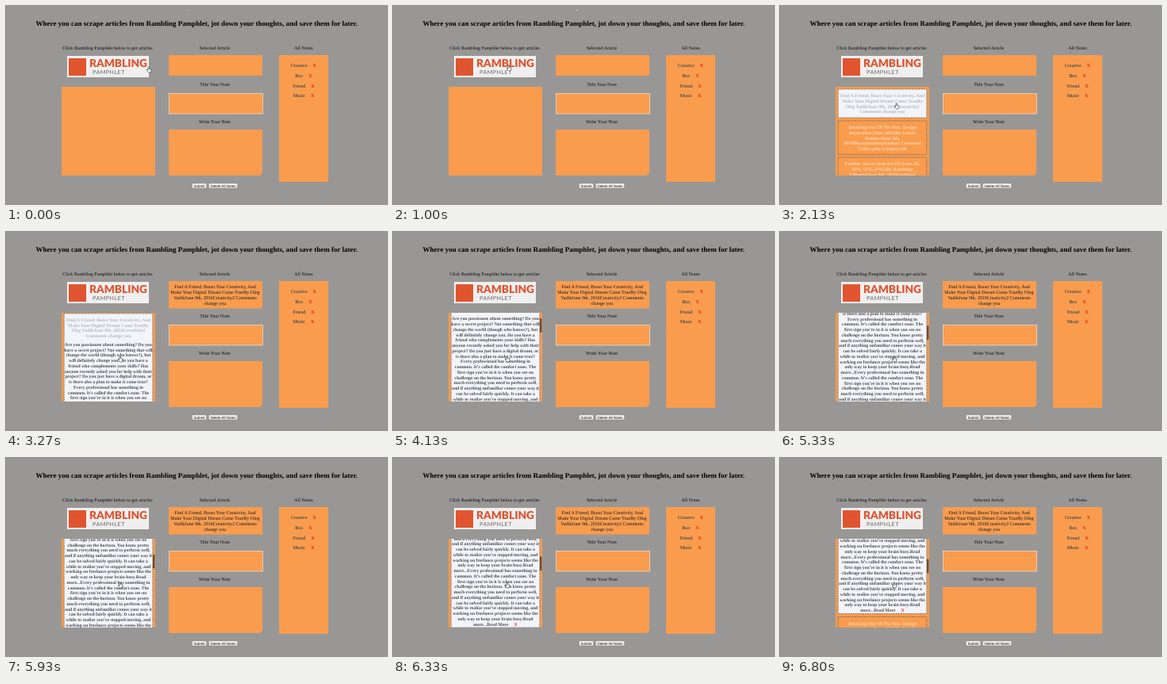
These frames come from a looping animation (480 px wide and 250 px high, 7.07 s). An HTML page:

```html
<!DOCTYPE html>
<html lang="en">
<head>
<meta charset="utf-8">
<title>Article notes</title>
<style>
  html, body { margin: 0; width: 100%; height: 100%; overflow: hidden; background: #999795; }
  svg { display: block; }
  text { font: 6.07px "Liberation Serif", serif; fill: #0c0c0c; text-anchor: middle; text-rendering: geometricPrecision; white-space: pre; }
  .title { font-size: 9.03px; font-weight: bold; fill: #000; }
  .box { fill: #f99c4e; }
  .field { stroke: #ecd9c6; stroke-width: .8; }
  .card { fill: #f99c4e; stroke: #58606a; stroke-width: .7; stroke-dasharray: 2 1; }
  .head { font-size: 5.92px; font-weight: bold; fill: #fbd7b3; }
  .body { font-size: 5.73px; font-weight: bold; fill: #4c4c50; }
  .hover .card { fill: #f2f4f9; }
  .hover .head { fill: #b6b8c0; }
  .picked { fill: #0c1a2c; }
  .note { fill: #0a3350; }
  .x { fill: #e32410; font-weight: bold; }
  .button { fill: #f4f4f4; stroke: #777; stroke-width: .4; }
  .label { font: 4.5px "Liberation Sans", sans-serif; }
  .brand { font: 900 13.7px Lato, sans-serif; fill: #e0552f; text-anchor: start; }
  .sub { font: 7.1px Lato, sans-serif; fill: #66676a; text-anchor: start; letter-spacing: .5px; }
</style>
</head>
<body>
<svg id="stage" width="480" height="250" viewBox="0 0 480 250"></svg>
<script>
const LOOP = 7070, LINE = 6.75, GROWTH = 196.5;
const LOADED = 1530, PICKED = 2470;

const intro = [
  'Are you passionate about something? Do you',
  'have a secret project? Not something that will',
  'change the world (though who knows?), but',
  'will definitely change you. Do you have a',
  'friend who complements your skills? Has',
  'anyone recently asked you for help with their',
  'project? Do you just have a digital dream, or',
  'is there also a plan to make it come true?'
];
const story = [
  'Every professional has something in',
  'common. It’s called the comfort zone. The',
  'first sign you’re in it is when you see no',
  'challenge on the horizon. You know pretty',
  'much everything you need to perform well,',
  'and if anything unfamiliar comes your way it',
  'can be solved fairly quickly. It can take a',
  'while to realize you’ve stopped moving, and',
  'working on freelance projects seems like the',
  'only way to keep your brain busy.Read'
];
const ending = 'more...Read More<tspan class="x" dx="7">X</tspan>';
const article = [...intro, ...story, 'more...' + story[0], ...story.slice(1), ending];

// Text positions name the middle of the lowercase letters.
const text = (x, y, s, cls = '') => `<text x="${x}" y="${y + 2}" class="${cls}">${s}</text>`;
const lines = (x, y, list, cls, step = LINE) =>
  list.map((s, i) => text(x, y + i * step, s, cls)).join('');
const rect = (x, y, w, h, cls, more = '') =>
  `<rect x="${x}" y="${y}" width="${w}" height="${h}" class="${cls}" ${more}/>`;
const card = (y, h, list, more = '') =>
  rect(73.2, y, 111.6, h, 'card', more) + lines(129, y + 8, list, 'head');
const button = (x, w, s) =>
  rect(x, 224, w, 6, 'button', 'rx="1.2"') + text(x + w / 2, 226.7, s, 'label');
const notes = ['Creative', 'Box', 'Friend', 'Music'].map((s, i) =>
  text(375, 75.3 + i * 12.7, `${s}<tspan class="x" dx="7">X</tspan>`, 'note')).join('');

stage.innerHTML = `
  ${rect(231, 5, 1, 1, '', 'id="dot" fill="#eee"')}
  ${text(240.3, 23.2, 'Where you can scrape articles from Rambling Pamphlet, jot down your thoughts, and save them for later.', 'title')}
  ${text(128, 52.5, 'Click Rambling Pamphlet below to get articles')}
  ${text(263, 52.5, 'Selected Article')}
  ${text(375, 52.5, 'All Notes')}
  ${rect(77, 63, 103, 27, '', 'fill="#f0efef"')}
  ${rect(79, 66, 22, 22, '', 'fill="#e0552f"')}
  <text x="105" y="77" class="brand">RAMBLING</text>
  <text x="109" y="86" class="sub">PAMPHLET</text>
  ${rect(70, 102, 118, 112, 'box')}
  <svg x="70" y="102" width="118" height="112" viewBox="70 102 118 112">
    <g id="list">
      <g id="first">
        ${card(105, 36, ['Find A Friend, Boost Your Creativity, And', 'Make Your Digital Dream Come TrueBy',
          'Oleg VadikJune 9th, 2016Creativity2', 'Comments change you'], 'id="paper"')}
        <g id="full">${lines(129, 144, article, 'body')}</g>
      </g>
      <g id="rest">
        ${card(145, 42.5, ['Breaking Out Of The Box: Design', 'Inspiration (June 2016)By Leonie', 'DekkersJune 8th,',
          '2016Illustrationinspiration1 Comment', 'Colors play a major role'])}
        ${card(191, 36, ['Freebie: Soccer Icon Set (15 Icons AI,', 'EPS, SVG, PNG)By Rambling',
          'EditorialJune 6th, 2016Freebies3', 'Comments icons'])}
      </g>
    </g>
    ${rect(185, 103, 2.4, 18, '', 'id="thumb" rx="1.2" fill="#70492a"')}
  </svg>
  ${rect(205, 62, 118, 26, 'box', 'id="chosen"')}
  <g id="picked">${lines(263.5, 68.8, ['Find A Friend, Boost Your Creativity, And',
    'Make Your Digital Dream Come TrueBy Oleg', 'VadikJune 9th, 2016Creativity2 Comments', 'change you'], 'picked', 7)}</g>
  <g id="form">
    ${text(263, 99.3, 'Title Your Note')}
    ${rect(205.5, 110.5, 118, 25.5, 'box field')}
    ${text(263, 146.2, 'Write Your Note')}
    <path d="M205 156h118v55l-3 3H205z" class="box"/>
    ${button(234.5, 18, 'Submit')}
    ${button(255.5, 36, 'Delete All Notes')}
  </g>
  ${rect(344, 62, 62, 160, 'box')}
  ${notes}
  <path id="hand" d="M-1-3v4l-1.6-1 .8 2.6 1.4 1.4h2.4l1-2V0L.4-.6V-3z" fill="#f6f6f6" stroke="#333" stroke-width=".6"/>`;

const at = Object.fromEntries([...stage.querySelectorAll('[id]')].map(e => [e.id, e]));

// Linear path through [time, value] points.
function track(keys, t) {
  const i = keys.findIndex(k => k[0] > t);
  if (i < 0) return keys[keys.length - 1][1];
  if (!i) return keys[0][1];
  const [[t0, a], [t1, b]] = [keys[i - 1], keys[i]];
  return a + (b - a) * (t - t0) / (t1 - t0);
}
const scrollKeys = [[3200, 0], [3270, 2], [4130, 34.5], [5330, 88.25], [5930, 108.5], [6800, 141]];
const handX = [[70, 180], [730, 146], [1530, 146], [2130, 147], [2800, 147], [3070, 144]];
const handY = [[70, 80], [730, 78], [1530, 78], [2130, 126], [2800, 126], [3070, 160]];

const show = (e, on) => e.setAttribute('visibility', on ? 'visible' : 'hidden');
const move = (e, x, y) => e.setAttribute('transform', `translate(${x} ${y})`);

function draw(t) {
  const open = t >= PICKED, scroll = track(scrollKeys, t), y = track(handY, t);
  show(at.dot, t < LOADED);
  show(at.list, t >= LOADED);
  at.full.style.display = at.picked.style.display = open ? '' : 'none';
  at.first.setAttribute('class', y > 104 ? 'hover' : '');
  at.paper.setAttribute('height', open ? 36 + GROWTH : 36);
  at.chosen.setAttribute('height', open ? 34.5 : 26);
  move(at.rest, 0, open ? GROWTH : 0);
  move(at.list, 0, -scroll);
  move(at.form, 0, open ? 7 : 0);
  show(at.thumb, t >= 3330);
  move(at.thumb, 0, scroll * .173);
  move(at.hand, track(handX, t), y);
}
function tick() {
  draw(performance.now() % LOOP);
  requestAnimationFrame(tick);
}
tick();
</script>
</body>
</html>
```
